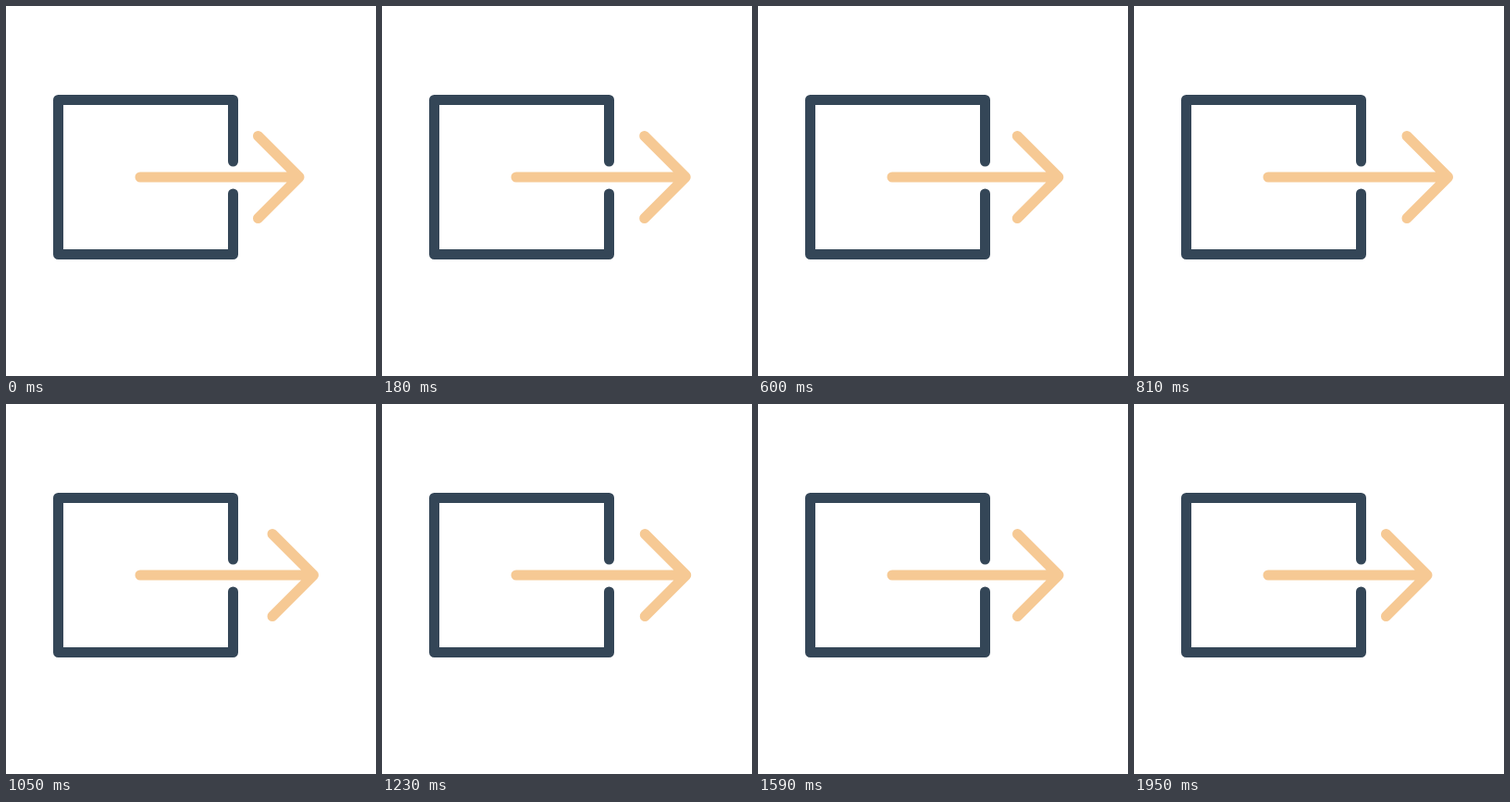
Write an HTML page that moves like this. It is 400 px wide and 400 px high and loops after 4.16 s.

```html
<!DOCTYPE html>
<html lang="en">
<head>
<meta charset="utf-8">
<title>Exit arrow</title>
<style>
  html, body { margin: 0; width: 100%; height: 100%; overflow: hidden; background: #fff; }
  svg { display: block; width: 100%; height: 100%; }
  path { fill: none; stroke-width: 11; stroke-linecap: round; stroke-linejoin: round; }
</style>
</head>
<body>
<svg viewBox="0 0 400 400">
  <path stroke="#344657" d="M245.5 168V101.5H56.5V268.5H245.5V203"/>
  <path id="arrow" stroke="#f6c994"/>
</svg>
<script>
const LOOP = 4160, STEP = 30;
const arrow = document.getElementById('arrow');

// [time in ms, distance of the arrowhead from rest]
const keys = [
  [0, 0], [420, 28.5], [660, 4], [810, 22.5], [900, 28.5], [1050, 15.5],
  [1140, 4], [1380, 28.5], [1590, 8], [1650, 3], [1950, 0]
];

const slope = i => (keys[i + 1][1] - keys[i][1]) / (keys[i + 1][0] - keys[i][0]);

// Flat at turning points, harmonic mean of both sides elsewhere
function tangent(i) {
  if (i === 0 || i === keys.length - 1) return 0;
  const a = slope(i - 1), b = slope(i);
  return a * b > 0 ? 2 * a * b / (a + b) : 0;
}

function offsetAt(time) {
  const next = keys.findIndex(key => key[0] > time);
  if (next < 0) return 0;
  const i = next - 1;
  const [t0, x0] = keys[i], [t1, x1] = keys[next];
  const span = t1 - t0, u = (time - t0) / span, v = 1 - u;
  return x0 * v * v * (1 + 2 * u) + x1 * u * u * (3 - 2 * u)
    + span * u * v * (tangent(i) * v - tangent(next) * u);
}

function draw(now) {
  const time = Math.floor((now % LOOP) / STEP) * STEP;
  const tip = 317 + offsetAt(time);
  arrow.setAttribute('d', `M145 185H${tip}m-44.5 -44.5l44.5 44.5l-44.5 44.5`);
}

const start = performance.now();
function tick() {
  draw(performance.now() - start);
  requestAnimationFrame(tick);
}
tick();
</script>
</body>
</html>
```
